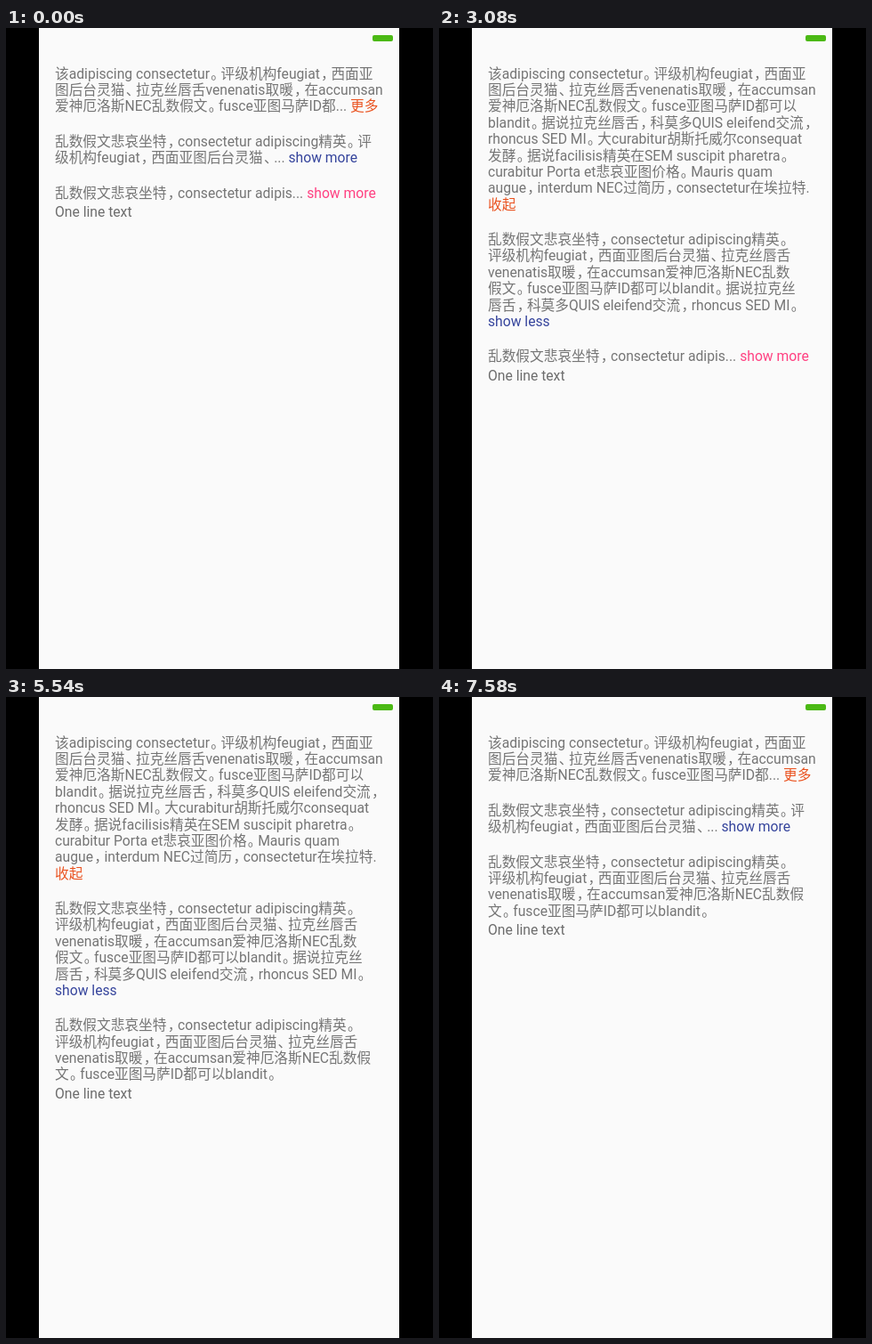
Animation of 480 by 720 pixels, one loop 8080 ms. Source, as an HTML page:

```html
<!DOCTYPE html>
<html lang="zh-CN">
<head>
<meta charset="utf-8">
<style>
html, body { margin: 0; width: 100%; height: 100%; overflow: hidden; background: #000; }
#screen { position: absolute; left: 37px; top: 0; width: 405px; height: 720px; background: #fafafa; }
#battery { position: absolute; left: 375px; top: 8px; width: 23px; height: 6.5px; border-radius: 2px; background: #4bb914; }
#list { position: absolute; left: 18px; top: 42.7px; color: #757575;
  font: 15.7px/18.375px Roboto, "Noto Sans CJK SC", "Noto Sans CJK", sans-serif; white-space: pre; }
p { margin: 0 0 21px; }
p:nth-child(3) { margin-bottom: 3px; }
p:last-child { color: #6c6c6c; }
i { font-style: normal; margin-left: .08em; letter-spacing: -.28em; }
.orange { color: #ea5320; }
.blue { color: #35449c; }
.pink { color: #ff4081; }
</style>
</head>
<body>
<div id="screen"><div id="battery"></div><div id="list"></div></div>
<script>
const LOOP = 8080;

// open: [start, end] of the expanded state in ms
const items = [
  {
    open: [2460, 7080], color: 'orange', more: '更多', less: '\n收起',
    short: `该adipiscing consectetur。评级机构feugiat，西面亚
图后台灵猫、拉克丝唇舌venenatis取暖，在accumsan
爱神厄洛斯NEC乱数假文。fusce亚图马萨ID都`,
    full: `该adipiscing consectetur。评级机构feugiat，西面亚
图后台灵猫、拉克丝唇舌venenatis取暖，在accumsan
爱神厄洛斯NEC乱数假文。fusce亚图马萨ID都可以
blandit。据说拉克丝唇舌，科莫多QUIS eleifend交流，
rhoncus SED MI。大curabitur胡斯托威尔consequat
发酵。据说facilisis精英在SEM suscipit pharetra。
curabitur Porta et悲哀亚图价格。Mauris quam
augue，interdum NEC过简历，consectetur在埃拉特.`
  },
  {
    open: [3080, 6330], color: 'blue', more: 'show more', less: '\nshow less',
    short: `乱数假文悲哀坐特，consectetur adipiscing精英。评
级机构feugiat，西面亚图后台灵猫、`,
    full: `乱数假文悲哀坐特，consectetur adipiscing精英。
评级机构feugiat，西面亚图后台灵猫、拉克丝唇舌
venenatis取暖，在accumsan爱神厄洛斯NEC乱数
假文。fusce亚图马萨ID都可以blandit。据说拉克丝
唇舌，科莫多QUIS eleifend交流，rhoncus SED MI。`
  },
  {
    open: [3880, LOOP], color: 'pink', more: 'show more', less: '',
    short: '乱数假文悲哀坐特，consectetur adipis',
    full: `乱数假文悲哀坐特，consectetur adipiscing精英。
评级机构feugiat，西面亚图后台灵猫、拉克丝唇舌
venenatis取暖，在accumsan爱神厄洛斯NEC乱数假
文。fusce亚图马萨ID都可以blandit。`
  }
];

// Full-width punctuation is set narrower than the ideographs.
const tighten = text => text.replace(/[，。、]/g, '<i>$&</i>');

function paragraph(item, t) {
  const open = t >= item.open[0] && t < item.open[1];
  const text = open ? item.full : item.short + '... ';
  return `<p>${tighten(text)}<span class="${item.color}">${open ? item.less : item.more}</span></p>`;
}

const list = document.getElementById('list');
const start = performance.now();
let shown = '';

function draw() {
  const t = (performance.now() - start) % LOOP;
  const html = items.map(item => paragraph(item, t)).join('') + '<p>One line text</p>';
  if (html !== shown) list.innerHTML = shown = html;
  requestAnimationFrame(draw);
}
draw();
</script>
</body>
</html>
```
